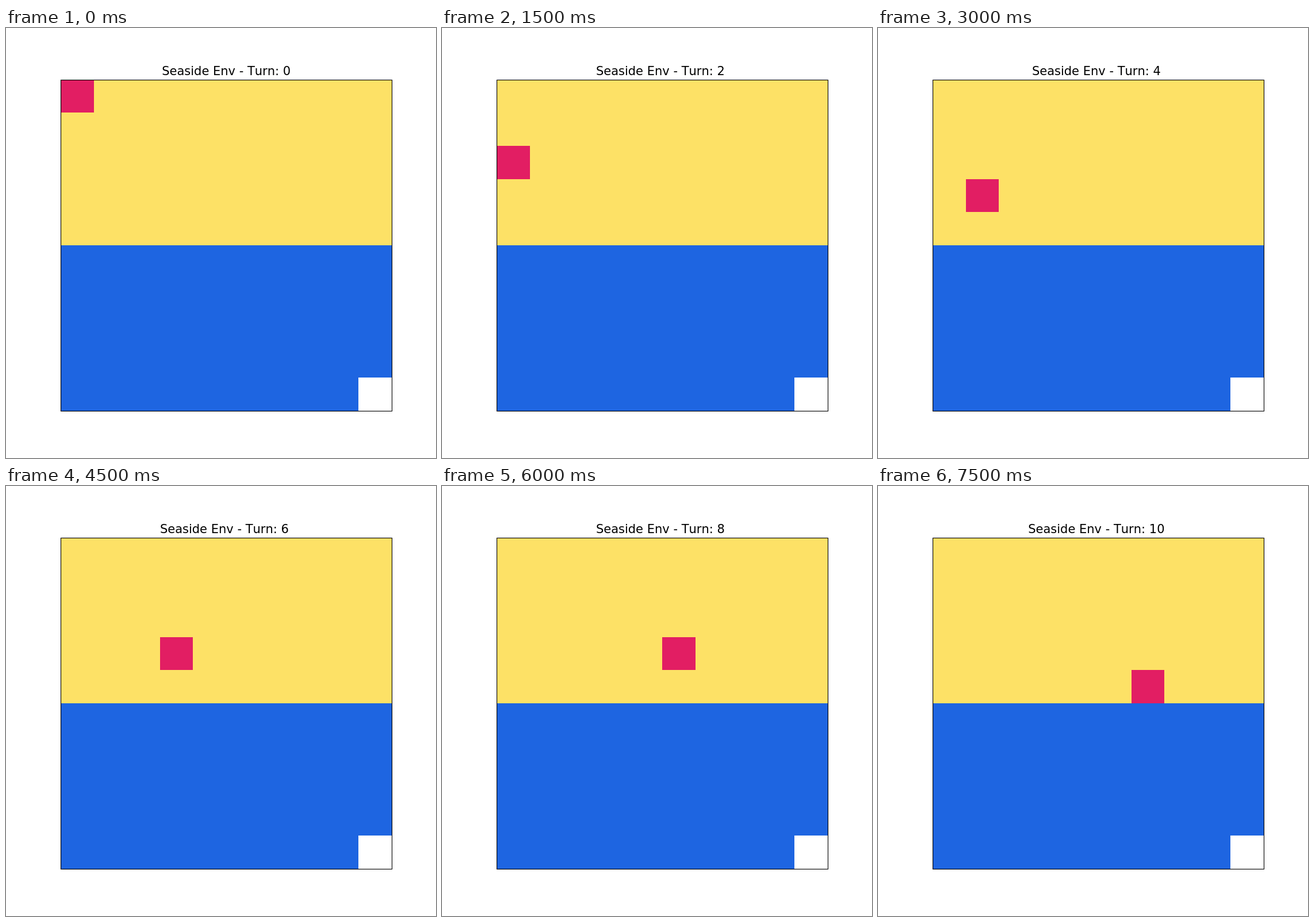
Write an HTML page that moves like this. It is 748 px wide and 748 px high and loops after 8 s.

```html
<!DOCTYPE html>
<html lang="en">
<head>
<meta charset="utf-8">
<title>Seaside grid</title>
<style>
  html, body { margin: 0; width: 100%; height: 100%; overflow: hidden; background: #fff; }
  svg { display: block; width: 748px; height: 748px; }
  text {
    font: 21px "DejaVu Sans", sans-serif;
    font-kerning: none;
    text-anchor: middle;
    white-space: pre;
  }
</style>
</head>
<body>
<svg viewBox="0 0 748 748">
  <g shape-rendering="crispEdges">
    <rect x="95" y="90" width="577" height="288" fill="#fde166"/>
    <rect x="95" y="378" width="577" height="289" fill="#1e65e1"/>
    <rect id="goal" fill="#fff"/>
    <rect id="agent" fill="#e21e63"/>
  </g>
  <rect x="95.5" y="90.5" width="576" height="576" fill="none" stroke="#000" stroke-width="1.11"/>
  <text id="title" x="383.2" y="82"></text>
</svg>
<script>
const LOOP = 8000, STEP = 750;
// Column and row of the agent on each turn.
const PATH = [
  [0, 0], [0, 1], [0, 2], [1, 2], [1, 3], [2, 3],
  [3, 3], [4, 3], [5, 3], [5, 4], [6, 4]
];
const [goal, agent, title] = ["goal", "agent", "title"].map(id => document.getElementById(id));

const edgeX = col => Math.floor(95.75 + 57.55 * col);
const edgeY = row => Math.floor(90.3 + 57.6 * row);

function placeCell(rect, [col, row]) {
  const x = edgeX(col), y = edgeY(row);
  const box = { x, y, width: edgeX(col + 1) - x, height: edgeY(row + 1) - y };
  for (const name in box) rect.setAttribute(name, box[name]);
}

let shown = -1;
function draw(time) {
  const turn = Math.floor((time % LOOP) / STEP);
  if (turn === shown) return;
  shown = turn;
  placeCell(agent, PATH[turn]);
  // After the first turn a trailing space shifts the centred title left.
  title.textContent = `Seaside Env - Turn: ${turn}${turn ? "\u00a0" : ""}`;
}

placeCell(goal, [9, 9]);
draw(0);
const start = performance.now();
requestAnimationFrame(function tick() {
  draw(performance.now() - start);
  requestAnimationFrame(tick);
});
</script>
</body>
</html>
```
